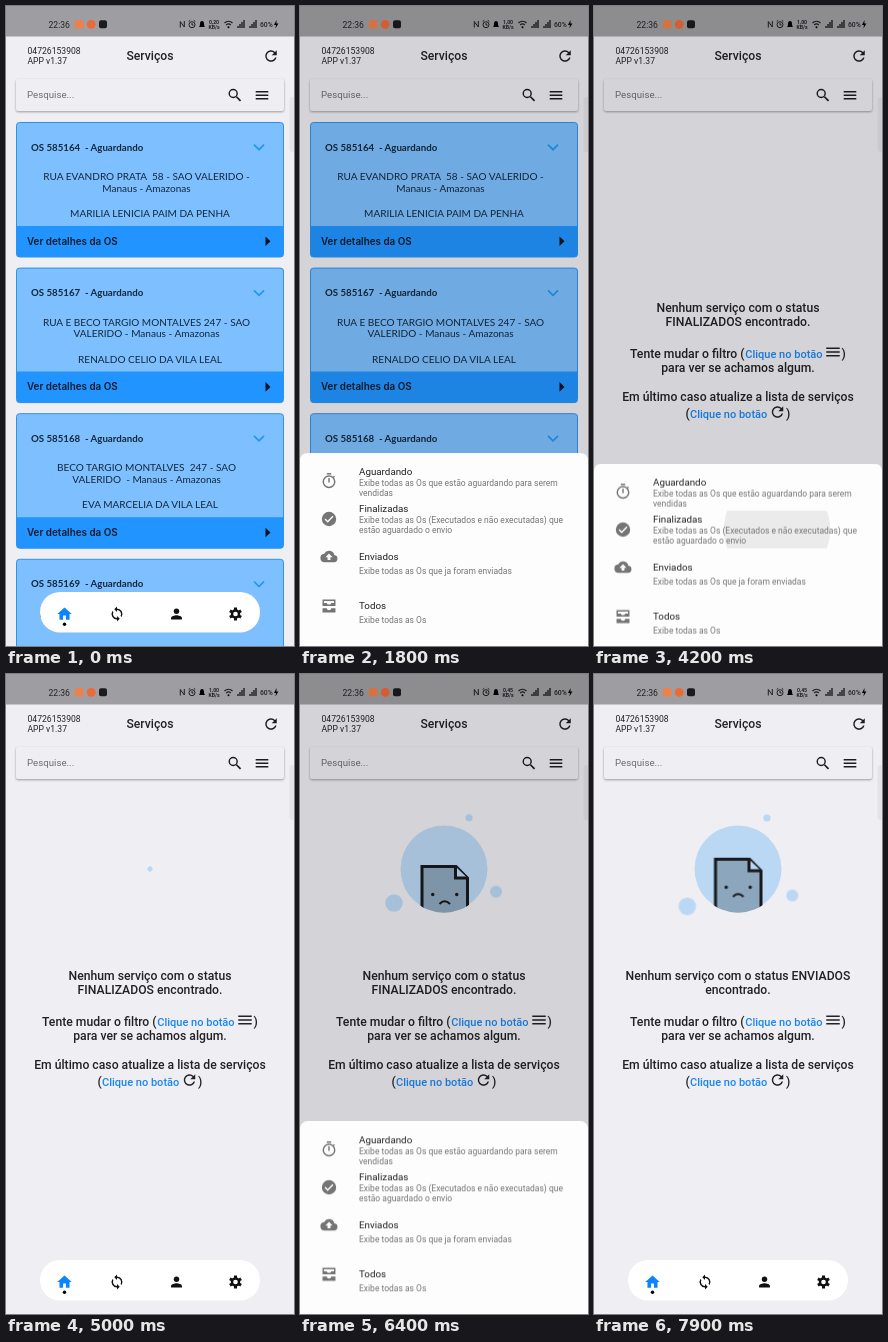
An HTML page that plays this animation: 288 by 640 pixels, repeating every 8000 ms.

```html
<!DOCTYPE html>
<html lang="pt-BR">
<head>
<meta charset="utf-8">
<title>Serviços</title>
<style>
  html, body { margin: 0; width: 100%; height: 100%; overflow: hidden; background: #eeeef3; }
  #stage { display: block; width: 288px; height: 640px; }
  text { font-family: Roboto, sans-serif; white-space: pre; fill: #212126; }
  .mid { text-anchor: middle; }
  .lato { font: 10.05px Lato, sans-serif; fill: #14283c; }
  .os { font: 700 9.7px Lato, sans-serif; fill: #14283c; }
  .more { font: 600 9.9px Inter, sans-serif; fill: #0c1c2c; }
  .msg { font-size: 12.2px; font-weight: 500; }
  .link { font-size: 11px; font-weight: 500; fill: #1a86f2; }
  .opt { font-size: 9.8px; }
  .hint { font-size: 8.5px; fill: #757575; }
  .tiny { font-size: 5.2px; font-weight: 700; }
  .search { filter: drop-shadow(.5px 1px 1.2px rgba(0, 0, 0, .35)); }
  .pop { transform-box: fill-box; transform-origin: center; }
</style>
</head>
<body>
<svg id="stage" viewBox="0 0 288 640" xmlns="http://www.w3.org/2000/svg"></svg>
<script>
const LOOP = 8000;

const ICONS = {
  search: '<circle cx="9.5" cy="9.5" r="5.5" fill="none" stroke="currentColor" stroke-width="2"/><path d="M14 14l5.7 5.7" stroke="currentColor" stroke-width="2.4"/>',
  menu: '<path d="M3 6h18v2H3zM3 11h18v2H3zM3 16h18v2H3z"/>',
  refresh: '<path d="M17.65 6.35A8 8 0 1 0 19.73 14h-2.08A6 6 0 1 1 16.22 7.78L13 11h7V4z"/>',
  home: '<path d="M10 20v-6h4v6h5v-8h3L12 3 2 12h3v8z"/>',
  sync: '<path id="half" d="M12 4V1L8 5l4 4V6a6 6 0 0 1 5.3 8.8l1.46 1.46A8 8 0 0 0 12 4z"/><use href="#half" transform="rotate(180 12 12)"/>',
  person: '<circle cx="12" cy="8" r="4"/><path d="M12 14c-2.67 0-8 1.34-8 4v2h16v-2c0-2.66-5.33-4-8-4z"/>',
  gear: '<path d="M12 2.2v19.6M3.5 7.1l17 9.8M3.5 16.9l17-9.8" stroke="currentColor" stroke-width="4.6"/><circle cx="12" cy="12" r="7.2"/><circle cx="12" cy="12" r="3.5" fill="#fff"/>',
  timer: '<path d="M9 2h6M12 8v6M18 7l1.6-1.6" stroke="currentColor" stroke-width="2"/><circle cx="12" cy="13" r="8" fill="none" stroke="currentColor" stroke-width="2"/>',
  check: '<circle cx="12" cy="12" r="10"/><path d="M6.5 12l3.7 3.7 7.3-7.4" fill="none" stroke="#fff" stroke-width="2"/>',
  cloud: '<path d="M19.35 10.04A7.5 7.5 0 0 0 5.35 8.04 6 6 0 0 0 6 20h13a5 5 0 0 0 .35-9.96zM14 13v4h-4v-4H7l5-5 5 5z"/>',
  inbox: '<path d="M4 4h16v7H4z" fill="none" stroke="currentColor" stroke-width="2"/><path d="M4 8h5a3 3 0 0 0 6 0h5v3H4zM3 15h6a3 3 0 0 0 6 0h6v6H3z"/>'
};

const icon = (name, x, y, color = '#1c1c20', k = .72) =>
  `<g transform="translate(${x} ${y}) scale(${k}) translate(-12 -12)" fill="${color}" color="${color}">${ICONS[name]}</g>`;
const text = (cls, x, y, s, extra = '') => `<text class="${cls}" x="${x}" y="${y}" ${extra}>${s}</text>`;

const CARDS = [
  ['585164', 'RUA EVANDRO PRATA  58 - SAO VALERIDO -', 'Manaus - Amazonas', 'MARILIA LENICIA PAIM DA PENHA'],
  ['585167', 'RUA E BECO TARGIO MONTALVES 247 - SAO', 'VALERIDO - Manaus - Amazonas', 'RENALDO CELIO DA VILA LEAL'],
  ['585168', 'BECO TARGIO MONTALVES  247 - SAO', 'VALERIDO  - Manaus - Amazonas', 'EVA MARCELIA DA VILA LEAL'],
  ['585169', 'RUA TARGIO MONTALVES 25 - SAO VALERIDO', '', '']
];

const card = ([os, street, city, name], i) => `<g transform="translate(0 ${116 + 145.6 * i})">
  <rect x="10.5" y=".5" width="267" height="134.5" rx="3" fill="#7dbfff"/>
  <path d="M11 104h266v29q0 2-2 2H13q-2 0-2-2z" fill="#2194ff"/>
  <rect x="10.5" y=".5" width="267" height="134.5" rx="3" fill="none" stroke="#2b93ea"/>
  ${text('os', 25, 28.7, `OS ${os}  - Aguardando`)}
  <path d="M248 22.7l5 5 5-5" fill="none" stroke="#2196f3" stroke-width="1.7"/>
  ${text('lato mid', 140.5, 58.2, street)}${text('lato mid', 140.5, 69.8, city)}${text('lato mid', 144, 95.2, name)}
  ${text('more', 21, 122.7, 'Ver detalhes da OS')}
  <path d="M259.5 114.5v9.6l5-4.8z" fill="#0c1420"/></g>`;

const signal = x => `<path d="M${x} 22v-2m2 2v-4m2 4v-6m2 6v-8" stroke="#1f1f22" stroke-width="1.4"/>`;
const speed = (id, n) => `<g id="${id}">${text('tiny mid', 208, 17.8, n)}${text('tiny mid', 208, 22.6, 'KB/s')}</g>`;

const statusBar = `<rect width="288" height="30.5" fill="#9e9ea2"/>
  ${text('', 42.5, 22, '22:36', 'font-size="8.6"')}
  <rect x="69" y="14" width="8.4" height="8.4" rx="1.5" fill="#f0804a"/>
  <circle cx="85.2" cy="18.3" r="4.4" fill="#ee6a35"/>
  <rect x="93" y="14.2" width="8" height="8" rx="2" fill="#1b1b1e"/>
  <g fill="none" stroke="#1f1f22">
    <path d="M174.3 21.5v-6l4 5.5v-6"/><circle cx="186" cy="18.7" r="3"/>
    <path d="M186 17v2h1.5M182.7 15.5l1.5-1.2M189.3 15.5l-1.5-1.2"/>
    <path d="M218.5 17a5.5 5.5 0 0 1 8 0M220.2 19a3.3 3.3 0 0 1 4.6 0" stroke-width="1.2"/></g>
  <path d="M193 21q1-1 1-3 0-3 2-3t2 3q0 2 1 3z"/><circle cx="222.5" cy="21.2" r="1"/>
  ${speed('speedA', '0,20')}${speed('speedB', '1,00')}${speed('speedC', '0,45')}
  ${signal(232)}${signal(244)}
  ${text('', 254, 20.5, '60%', 'font-size="6.8" font-weight="500"')}
  <path d="M270.5 14l-2.5 5h2l-.6 3.5 3-5h-2z"/>`;

const header = `${text('', 21.5, 48, '04726153908', 'font-size="8.6"')}${text('', 21.5, 58, 'APP v1.37', 'font-size="8.6"')}
  ${text('msg mid', 144, 54.3, 'Serviços')}${icon('refresh', 265, 50)}
  <rect class="search" x="10" y="73" width="268" height="32" rx="2" fill="#eeeef3"/>
  ${text('', 21, 92.3, 'Pesquise...', 'font-size="9.7" style="fill:#6d6d73"')}
  ${icon('search', 229, 89.3)}${icon('menu', 256, 89.3, '#1c1c20', .7)}
  <rect x="283.5" y="91" width="7" height="55" rx="3" fill="#e3e3e8"/>`;

const empty = `${text('msg mid', 144, 305.5, 'Nenhum serviço com o status', 'id="done1"')}
  ${text('msg mid', 144, 320.3, 'FINALIZADOS encontrado.', 'id="done2"')}
  ${text('msg mid', 144, 305.5, 'Nenhum serviço com o status ENVIADOS', 'id="sent1"')}
  ${text('msg mid', 144, 320.3, 'encontrado.', 'id="sent2"')}
  ${text('msg', 36, 351.6, 'Tente mudar o filtro (')}${text('link', 151.3, 351.6, 'Clique no botão')}
  ${icon('menu', 239, 346, '#212126', .75)}${text('msg', 247.5, 351.6, ')')}
  ${text('msg mid', 144, 366, 'para ver se achamos algum.')}
  ${text('msg mid', 144, 394.5, 'Em último caso atualize a lista de serviços')}
  ${text('msg', 91.5, 411.5, '(')}${text('link', 96, 411.5, 'Clique no botão')}
  ${icon('refresh', 183.5, 406, '#212126')}${text('msg', 192, 411.5, ')')}`;

const art = `<clipPath id="disc"><circle cx="144" cy="195" r="43.7"/></clipPath>
  <circle id="blob" class="pop" cx="144" cy="195" r="43.5" fill="#bad8f4"/>
  <g fill="#bad8f4"><circle id="dotA" r="3.6"/><circle id="dotB" r="8.7"/><circle id="dotC" r="6"/></g>
  <g clip-path="url(#disc)"><g id="doc" fill="none" stroke="#17191d" stroke-width="3">
    <path d="M122 256v-63.5h34l11.5 11.5v52z" fill="#8ca6be"/>
    <path d="M155.5 192.5V204h12" fill="#bad8f4"/>
    <path d="M139.5 230q5-5.500 10.500 0" stroke-width="2"/>
    <g fill="#17191d" stroke="none"><circle cx="132.7" cy="220.5" r="1.7"/><circle cx="156.7" cy="220.5" r="1.7"/></g>
  </g></g>`;

const nav = `<rect x="34" y="586" width="220" height="40.5" rx="20" fill="#fff"/>
  ${icon('home', 58.5, 608, '#0a84ff')}<circle cx="58.5" cy="618.3" r="1.7"/>
  ${icon('sync', 111, 608, '#111', .68)}${icon('person', 170.5, 608, '#111', .68)}${icon('gear', 229.5, 608, '#111', .66)}`;

// Each option: icon, icon y, title y, title, then hint lines with their y.
const OPTIONS = [
  ['timer', 28, 21.5, 'Aguardando', [32.5, 'Exibe todas as Os que estão aguardando para serem'], [42.5, 'vendidas']],
  ['check', 66, 59, 'Finalizadas', [70, 'Exibe todas as Os (Executados e não executadas) que'], [80, 'estão aguardado o envio']],
  ['cloud', 103.5, 106.5, 'Enviados', [120.5, 'Exibe todas as Os que ja foram enviadas']],
  ['inbox', 153, 155.5, 'Todos', [169.5, 'Exibe todas as Os']]
];
const option = ([name, iy, ty, title, ...hints]) => icon(name, 29, iy, '#757575') + text('opt', 59, ty, title) +
  hints.map(([y, s]) => text('hint', 59, y, s)).join('');
const ripple = (id, y, h, x) => `<svg y="${y}" width="288" height="${h}"><circle id="${id}" class="pop" cx="${x}" cy="${h / 2}" r="53" opacity=".07"/></svg>`;

document.getElementById('stage').innerHTML = `<rect width="288" height="640" fill="#eeeef3"/>
  <g id="list">${CARDS.map(card).join('')}</g>
  <g id="empty">${empty}</g><g id="art">${art}</g>
  ${nav}${statusBar}${header}
  <circle id="touch" cx="258" cy="90.5" r="8" fill="#fff"/>
  <rect id="dim" width="288" height="640"/>
  <g id="sheet"><path d="M0 655V455q0-8 8-8h272q8 0 8 8v200z" fill="#fdfdfd"/>
    <g transform="translate(0 447)">${ripple('tapA', 47, 38, 183)}${ripple('tapB', 88, 46, 165)}${OPTIONS.map(option).join('')}</g></g>`;

// steps: [time, value, easing to the next step]
const play = (id, prop, steps) => {
  const all = [[0, steps[0][1]], ...steps, [LOOP, steps[steps.length - 1][1]]];
  document.getElementById(id).animate(
    all.map(([t, v, easing = 'linear']) => ({ offset: t / LOOP, [prop]: v, easing })),
    { duration: LOOP, iterations: Infinity });
};
const show = (id, from, to) => play(id, 'opacity',
  [[from, 0], [from, 1], [to, 1], [to, 0]].filter(([t]) => t > 0 && t < LOOP));
const at = (x, y) => `translate(${x}px, ${y}px)`;

show('list', 0, 4120);
show('empty', 4120, LOOP);
['done1', 'done2'].forEach(id => show(id, 0, 7130));
['sent1', 'sent2'].forEach(id => show(id, 7130, LOOP));
show('speedA', 0, 1000);
show('speedB', 1000, 5500);
show('speedC', 5500, LOOP);

const RISE = 'cubic-bezier(0, 0, .2, 1)', FALL = 'cubic-bezier(.8, 0, 1, 1)';
const DOWN = at(0, 194), UP = at(0, 0);
play('sheet', 'transform', [
  [900, DOWN, RISE], [1080, UP], [4140, UP, FALL], [4340, DOWN],
  [6230, DOWN, RISE], [6410, UP], [7140, UP, FALL], [7340, DOWN]]);
play('dim', 'opacity', [
  [900, 0], [985, .11], [4210, .11], [4340, 0],
  [6230, 0], [6310, .11], [7210, .11], [7340, 0]]);

play('touch', 'opacity', [
  [760, 0], [800, .5], [880, .5], [920, 0], [6020, 0], [6060, .5], [6160, .5], [6230, 0]]);
play('tapA', 'transform', [[4020, 'scale(0)'], [4200, 'scale(1)'], [4340, 'scale(1.8)'], [4341, 'scale(0)']]);
play('tapB', 'transform', [[7020, 'scale(0)'], [7200, 'scale(1)'], [7340, 'scale(1.8)'], [7341, 'scale(0)']]);

play('blob', 'transform', [[4990, 'scale(0)', 'ease-out'], [5300, 'scale(1)']]);
play('doc', 'transform', [[5450, at(0, 60), 'ease-out'], [6000, at(0, 0)], [6400, at(0, 0), 'ease-in-out'], [7900, at(-.5, -7.3)]]);
const drift = (id, ...path) => play(id, 'transform', [
  [5450, at(144, 195) + ' scale(0)', 'ease-out'],
  ...path.map(([x, y], i) => [[6100, 6400, 7900][i], at(x, y) + ' scale(1)'])]);
drift('dotA', [168, 144.5], [169, 143.7], [173, 144]);
drift('dotB', [93.3, 228], [94, 229], [93.3, 232.3]);
drift('dotC', [194.5, 217.5], [196, 217.7], [198.3, 221.5]);
</script>
</body>
</html>
```
